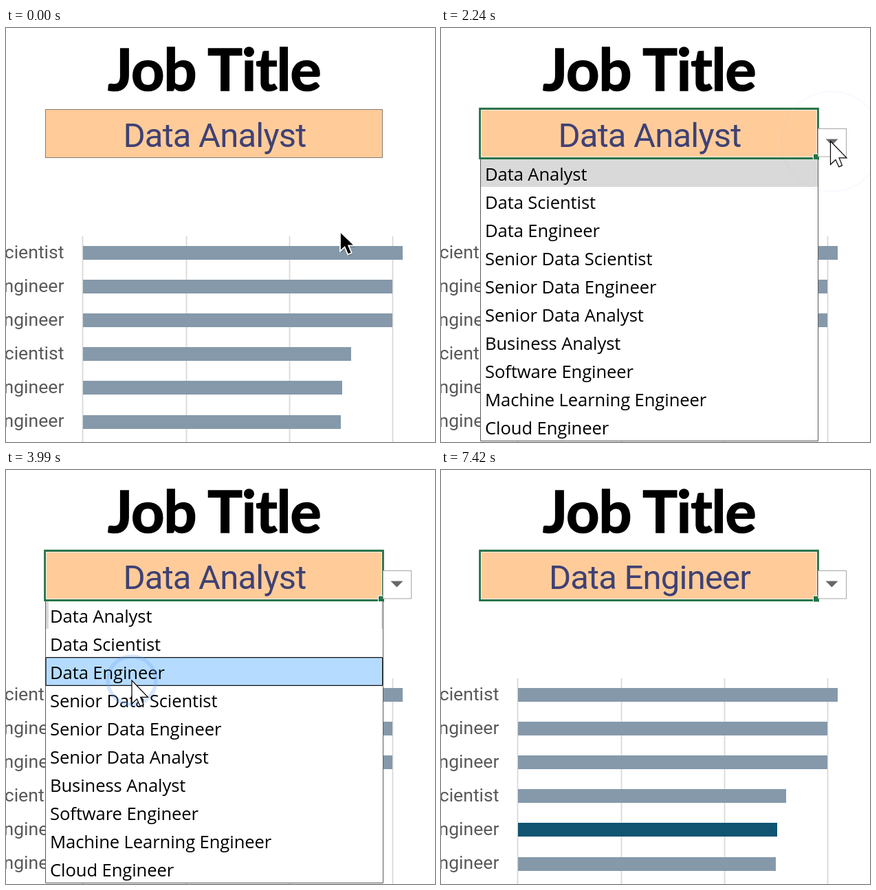
Write an HTML page that moves like this. It is 624 px wide and 602 px high and loops after 7.77 s.

```html
<!DOCTYPE html>
<html lang="en">
<head>
<meta charset="utf-8">
<title>Job title picker</title>
<style>
html, body { margin: 0; width: 100%; height: 100%; overflow: hidden; background: #fff; }
svg { display: block; width: 624px; height: 602px; }
.ui { font-family: Roboto, "Liberation Sans", sans-serif; }
#title { font: 700 84.5px Lato, "Open Sans", sans-serif; letter-spacing: -1px; stroke: #000; stroke-width: 1.6px; }
#value { font-size: 49px; letter-spacing: -.8px; fill: #3f4175; text-anchor: middle; }
#labels { font-size: 26.6px; fill: #595959; text-anchor: end; }
#items { font: 25.6px "Open Sans", "Noto Sans", sans-serif; letter-spacing: -.1px; }
</style>
</head>
<body>
<svg viewBox="0 0 624 602">
  <text id="title" x="148" y="90.5">Job Title</text>
  <g id="chart"></g>
  <g id="labels" class="ui"></g>

  <rect x="57.5" y="118.5" width="490" height="70" fill="#ffcc99" stroke="#857a70"/>
  <text id="value" class="ui" x="303.5" y="173"></text>

  <g id="selection" fill="none">
    <rect id="inner" y="119.5" height="68" stroke="#fff" stroke-opacity=".8"/>
    <rect id="outer" y="117.2" height="72.4" stroke="#217346" stroke-width="2.7"/>
    <rect id="handle" x="541.5" y="183" width="9" height="9" fill="#217346" stroke="#fff"/>
  </g>
  <g id="button">
    <rect x="548.5" y="146.5" width="41" height="40.5" fill="#fff" stroke="#a6a6a6"/>
    <path d="M559.5 161.5h18l-9 9z" fill="#686868"/>
  </g>

  <g id="list">
    <path d="M57.5 191V600.5H548.5V191" fill="#fff" stroke="#5a5a5a"/>
    <rect id="current" x="58" y="191" width="490" height="40" fill="#d9d9d9"/>
    <path id="edges" d="M58 191h4v40h-4zM546 191h2v40h-2z" fill="#d9d9d9"/>
    <rect id="hover" x="58" width="490" height="41" fill="#e5f3ff"/>
    <rect id="picked" x="58" y="272.7" width="489.7" height="40.6" rx="1" fill="#b5dcff" stroke="#111" stroke-width="1.2"/>
    <g id="items"></g>
  </g>

  <circle id="ring" fill="none" stroke="#6ea4f5"/>

  <g id="pointer">
    <g id="dark">
      <path d="M1.5 2V31L8 25.5 12.5 35.5 18.5 33 14 23H23z" fill="#000" opacity=".18"/>
      <path d="M0 0V28.5L6.6 22.5 11.3 33.3 16.8 31 12.2 20.3H21z" fill="#000" stroke="#fff" stroke-width="1.8"/>
    </g>
    <g id="cross">
      <path d="M-4 -12H7V-3H16V8H7V17H-4V8H-13V-3H-4z" fill="#000"/>
      <path d="M-5.5 -13.5H5.5V-4.5H14V5H5.5V13.5H-5.5V5H-14V-4.5H-5.5z" fill="#fff" stroke="#000" stroke-width="1.6"/>
    </g>
    <path id="light" d="M0 0V34L7.4 27 12.3 37.4 17 35.4 12.6 24.4H23.5z" fill="#fff" stroke="#000" stroke-width="1.2"/>
  </g>
</svg>
<script>
const LOOP = 7770, STEP = 70;
const OPEN = 1890, PICK = 3990, COMMIT = 4970, CLOSE = 5250;
const ROW = 41, LIST_TOP = 190.5;
const CLICKS = [[980, 515.5, 161], [1820, 568, 165], [PICK, 183, 306]];

// time, x, y: the pointer eases between neighbouring stops
const STOPS = [
  [0, 486, 296], [700, 513, 160], [1120, 513, 160], [1750, 566.5, 164.5],
  [2520, 566.5, 164.5], [3150, 202.5, 243.5], [3500, 183, 306], [LOOP, 183, 306]
];
const ITEMS = ["Data Analyst", "Data Scientist", "Data Engineer", "Senior Data Scientist",
  "Senior Data Engineer", "Senior Data Analyst", "Business Analyst", "Software Engineer",
  "Machine Learning Engineer", "Cloud Engineer"];
const BARS = [["Data Scientist", 577], ["Data Engineer", 562], ["Data Engineer", 562],
  ["Data Scientist", 502], ["Data Engineer", 489], ["Data Engineer", 487]];

const $ = id => document.getElementById(id);
const clamp = v => Math.min(1, Math.max(0, v));
const span = (t, a, b) => clamp((t - a) / (b - a));
const mix = (a, b, p) => a + (b - a) * p;
const smooth = p => p * p * (3 - 2 * p);
const show = (id, on) => $(id).setAttribute("visibility", on ? "inherit" : "hidden");

function set(el, attrs) {
  for (const key in attrs) el.setAttribute(key, attrs[key]);
  return el;
}

function add(parent, tag, attrs, text = "") {
  const el = set(document.createElementNS("http://www.w3.org/2000/svg", tag), attrs);
  el.textContent = text;
  $(parent).appendChild(el);
  return el;
}

const barBox = (i, right) => ({ x: 112, y: Math.round(317 + i * 49.1), width: right - 112, height: 20 });

for (const x of [111.5, 262.5, 412.5, 562.5])
  add("chart", "path", { d: `M${x} 303V602`, stroke: "#d9d9d9", "stroke-width": 1.8 });
BARS.forEach(([name, right], i) => {
  add("chart", "rect", { ...barBox(i, right), fill: "#8599aa" });
  add("labels", "text", { x: 84.5, y: 335 + i * 49 }, name);
});
const accent = add("chart", "rect", { ...barBox(4, 489), fill: "#105472" });
ITEMS.forEach((name, i) => add("items", "text", { x: 64, y: 222 + i * ROW }, name));

function pointerAt(t) {
  const i = STOPS.findIndex(s => s[0] > t);
  const [t0, x0, y0] = STOPS[i - 1], [t1, x1, y1] = STOPS[i];
  const p = smooth(span(t, t0, t1));
  return [mix(x0, x1, p), mix(y0, y1, p)];
}

function drawPointer(t, x, y, open) {
  const kind = open || x > 548 ? "light" : y > 235 ? "dark" : "cross";
  for (const id of ["dark", "cross", "light"]) show(id, id === kind);
  set($("pointer"), { transform: `translate(${x} ${y})`, opacity: 1 - span(t, 4480, 4760) });
}

function drawRing(t) {
  const click = CLICKS.find(c => t >= c[0] && t < c[0] + 450);
  show("ring", click);
  if (!click) return;
  const age = t - click[0], p = age / 450;
  set($("ring"), {
    cx: click[1], cy: click[2],
    r: 35 + 40 * p ** .85,
    "stroke-width": mix(5.5, 2, p),
    opacity: .8 * (1 - p) * Math.min(1, .35 + age / 100)
  });
}

function drawSelection(t) {
  const p = span(t, 980, 1170);
  const left = mix(760, 56.5, p), right = mix(1250, 548.5, p);
  show("selection", t >= 980);
  show("handle", p === 1);
  show("button", t >= 980);
  set($("outer"), { x: left, width: right - left });
  set($("inner"), { x: left + 2, width: right - left - 4 });
}

function drawList(t, y, open) {
  const row = Math.floor((y - LIST_TOP) / ROW), picked = t >= PICK;
  show("list", open);
  show("current", !picked);
  show("edges", picked);
  show("picked", picked);
  show("hover", !picked && row > 0);
  set($("hover"), { y: LIST_TOP + row * ROW });
}

function draw(time) {
  const t = Math.floor(time % LOOP / STEP) * STEP;
  const open = t >= OPEN && t < CLOSE;
  const [x, y] = pointerAt(t);
  $("value").textContent = ITEMS[t >= COMMIT ? 2 : 0];
  set(accent, { width: 377 * smooth(span(t, CLOSE - STEP, 5530)) });
  drawSelection(t);
  drawList(t, y, open);
  drawRing(t);
  drawPointer(t, x, y, open);
}

const start = performance.now();
function tick() {
  draw(performance.now() - start);
  requestAnimationFrame(tick);
}
tick();
</script>
</body>
</html>
```
